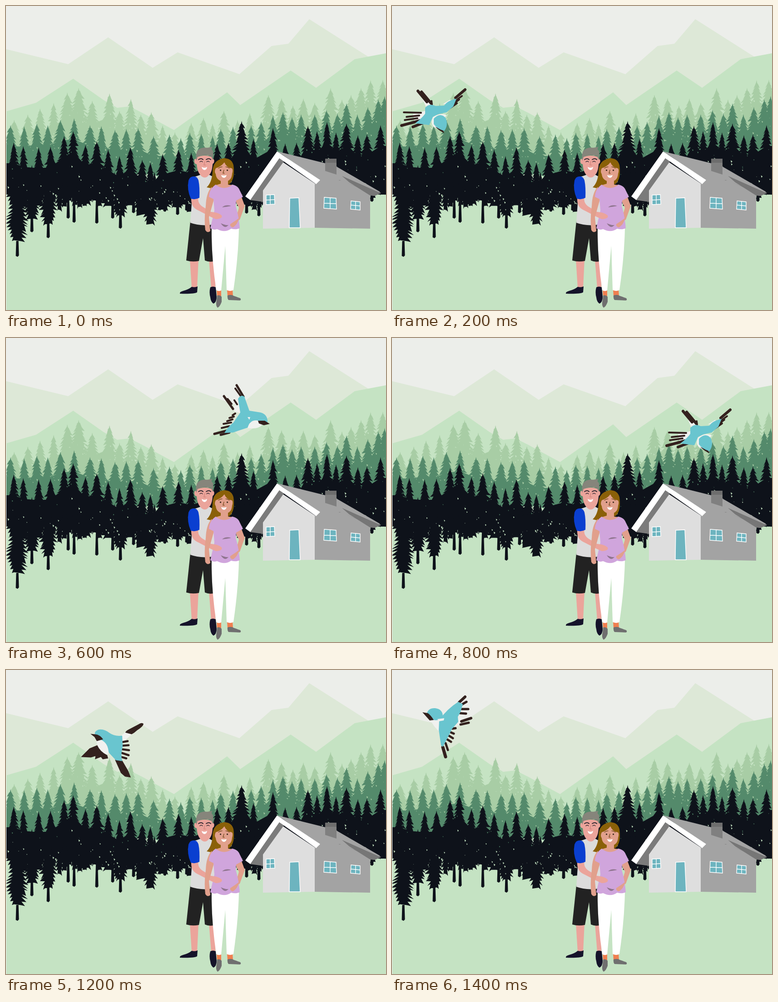
Animation of 837 by 669 pixels, one loop 1600 ms. Source, as an HTML page:

```html
<!DOCTYPE html>
<html lang="en">
<head>
<meta charset="utf-8">
<title>Forest home</title>
<style>
html, body { margin: 0; width: 100%; height: 100%; overflow: hidden; background: #eceeea; }
svg { display: block; width: 100%; height: 100%; }
.line { fill: none; stroke-linecap: round; stroke-linejoin: round; }
</style>
</head>
<body>
<svg viewBox="0 0 837 669">
  <rect width="837" height="669" fill="#eceeea"/>
  <path fill="#dde8d7" d="M0 95L137 128L225 69L323 136L378 102L514 150L585 88L622 83L668 29L797 111L837 137V400H0Z"/>
  <path fill="#c5e3c3" d="M0 232L66 213L148 160L215 207L245 224L272 221L300 235L370 273L487 190L516 218L627 142L683 180L768 117L837 104V669H0Z"/>
  <g id="forest"></g>
  <path fill="#eceeea" d="M0 232H1V669H0Z"/>

  <g id="house">
    <path fill="#dedede" d="M566 404L606 341L681 391L680 488L566 490Z"/>
    <path fill="#a3a3a3" d="M680 392L700 374L802 410V490L680 488Z"/>
    <path fill="#767676" d="M692 382L735 369L826 411L812 418L692 390Z"/>
    <path fill="#a3a3a3" d="M598 320L703 346L729 354L824 409L812 413L735 383L712 391L691 384Z"/>
    <path fill="#a3a3a3" d="M684 392L692 383L740 384L802 411V430H682Z"/>
    <path fill="#767676" d="M740 374L826 412L811 418L802 417L756 388Z"/>
    <path fill="#7b7b7b" d="M601 332L612 342L566 406V431L537 427Z"/>
    <path fill="#fff" d="M597 320L692 383L683 392L602 335L538 427L527 419Z"/>
    <path fill="#808080" d="M703 344H728V371L703 363Z"/>
    <path fill="#6e6e6e" d="M703 336H728V345H703Z"/>
    <g fill="#6db4bf" stroke="#fff" stroke-width="1.4">
      <path d="M625 423L645 422L648 488H624Z"/>
      <path d="M573 416L591 415L592 436L573 437ZM582 416V437M573 427L592 426"/>
      <path d="M701 421L727 423L728 447L700 445ZM714 422V446M701 434L728 435"/>
      <path d="M760 429L780 431V449L759 447ZM770 430V448M759 438L780 440"/>
    </g>
  </g>

  <g id="man">
    <path fill="#eba49b" d="M405 558H424L421 620H409ZM447 558H463L461 621H452Z"/>
    <path fill="#15132a" d="M409 618Q417 620 422 617L421 630Q415 634 383 633Q382 629 390 627Q402 624 409 618ZM450 619Q456 616 462 619L464 640Q464 652 457 655Q451 651 450 641Q447 630 450 619Z"/>
    <path fill="#222" d="M406 474H456L461 561Q449 565 438 560L434 511L425 561Q410 564 397 560Z"/>
    <path fill="#dcdcdc" d="M411 377Q422 374 429 371H447L462 379V480Q430 486 406 477L410 420Z"/>
    <path fill="#eba49b" d="M429 362H446V373Q438 382 429 373ZM408 423L424 420Q421 433 432 441L458 457Q470 457 475 462Q477 468 462 469Q449 463 420 448Q407 441 408 423Z"/>
    <path fill="#0a3fd0" d="M416 375Q405 374 402 384Q398 404 407 424Q417 427 426 422Q427 398 424 384Q422 377 416 375Z"/>
    <path fill="#eba49b" d="M420 333Q438 325 455 333L456 337Q460 337 458 345L455 348Q454 375 437 376Q422 374 420 348Q414 348 415 339Q416 335 420 337Z"/>
    <path fill="#86857b" d="M419 341Q417 326 422 318Q431 310 443 312L455 310Q450 315 456 319Q457 329 455 339L452 330Q436 325 422 332Z"/>
    <path class="line" stroke="#332a32" stroke-width="2" d="M424 338Q430 334 434 338M441 338Q447 334 451 338"/>
    <path class="line" stroke="#332a32" stroke-width="1.3" d="M427 343Q430 340 433 343M442 343Q445 340 448 343"/>
    <path class="line" stroke="#d5867e" stroke-width="1.5" d="M438 342L436 350H440"/>
    <path fill="#fff" d="M431 354Q437 358 443 354Q442 361 437 361Q432 360 431 354Z"/>
  </g>

  <g id="woman">
    <path fill="#8a6008" d="M480 335Q497 335 501 350Q505 380 493 391L478 399Q460 404 442 399Q454 388 455 363Q456 339 480 335Z"/>
    <path fill="#f07f50" d="M464 624H474V639H465ZM487 624H499L500 639H488Z"/>
    <path fill="#6f6f6f" d="M465 637Q471 635 475 640V651Q471 662 466 664Q461 659 464 647ZM488 637Q496 634 502 638L516 643Q519 647 515 648L490 647Q487 643 488 637Z"/>
    <path fill="#fff" d="M453 488H513Q512 550 501 625Q494 629 486 625L483 528L474 626Q467 629 463 625Q452 550 453 488Z"/>
    <path fill="#e1a08c" d="M453 398Q441 411 440 440Q436 468 439 493Q444 501 450 495L447 465L459 422ZM519 421L505 427L513 444Q508 460 506 477L515 470L526 440Z"/>
    <path fill="#d0a5dc" d="M462 393Q481 405 498 393Q511 395 515 406L522 420L507 428L506 440Q513 463 515 489Q506 493 496 490Q482 500 465 491Q457 494 450 489L459 450L457 425L447 420Q448 402 462 393Z"/>
    <path fill="#e1a08c" d="M473 377H489V393L498 394Q480 407 463 394L473 391ZM514 466Q510 481 500 487Q493 486 494 480L506 472Z"/>
    <path fill="#eba49b" d="M452 453Q470 455 475 461Q478 468 462 469L449 463Z"/>
    <path fill="#8f758f" d="M476 443Q484 436 496 440Q487 442 476 443ZM473 478Q483 483 490 482Q482 492 473 478Z"/>
    <path fill="#e1a08c" d="M462 357Q473 354 481 344Q486 356 497 357Q501 359 498 369Q497 386 480 387Q463 384 462 370Q458 365 462 357Z"/>
    <path class="line" stroke="#805328" stroke-width="1.5" d="M468 357Q472 354 476 354M484 354Q488 354 492 357M480 361L478 368H481"/>
    <path fill="#50382b" d="M471 360H474V363H471ZM486 360H489V363H486Z"/>
    <path fill="#fff" d="M474 372Q480 374 486 372Q484 379 479 378Q475 377 474 372Z"/>
  </g>
  <g id="bird"></g>
</svg>
<script>
const NS = "http://www.w3.org/2000/svg";
let seed = 7;

function rand(a = 0, b = 1) {
  seed = (seed * 16807) % 2147483647;
  return a + (b - a) * seed / 2147483647;
}

function add(parent, d, fill, line) {
  const p = document.createElementNS(NS, "path");
  p.setAttribute("d", d);
  p.setAttribute("fill", line ? "none" : fill);
  if (line) {
    p.setAttribute("stroke", fill);
    p.setAttribute("stroke-width", line);
    p.setAttribute("class", "line");
  }
  parent.appendChild(p);
}

const shape = pts => "M" + pts.map(p => p.map(v => v.toFixed(1)).join(" ")).join("L") + "Z";

// A fir: drooping branch tips down both sides of a spire
function tree(x, top, h, w) {
  const n = Math.round(h / 8);
  const side = s => {
    const pts = [];
    for (let i = 1; i <= n; i++) {
      const t = i / n;
      const taper = t > .72 ? 1 - (t - .72) * 2 : 1;
      const r = w * t ** .72 * taper;
      const y = top + h * t;
      pts.push([x + s * r * rand(.8, 1.15), y + rand(0, 4)]);
      pts.push([x + s * r * rand(.4, .62), y + rand(-2, 1)]);
    }
    return pts;
  };
  return shape([[x, top], [x + 1.2, top + 6], ...side(1), ...side(-1).reverse(), [x - 1.2, top + 6]]);
}

function layer(parent, color, flat, h, w, floor, gap) {
  const tops = [];
  for (let i = 0; i < flat.length; i += 2) tops.push([flat[i], flat[i + 1]]);
  let d = shape([[0, tops[0][1] + gap], ...tops.map(([x, y]) => [x, y + gap]),
    [837, tops.at(-1)[1] + gap], [837, floor], [0, floor]]);
  for (const [x, y] of tops) d += tree(x, y, h + rand(-8, 8), w * rand(.85, 1.15));
  add(parent, d, color);
  return tops;
}

function specks(parent, color, tops, near, far, count, size) {
  let d = "";
  for (let i = 0; i < count; i++) {
    const [tx, ty] = tops[Math.floor(rand(0, tops.length))];
    const x = tx + rand(-15, 15), y = ty + rand(near, far), s = rand(1, size);
    d += shape([[x, y], [x + s, y + s * .6], [x + s * .3, y + s * 1.4]]);
  }
  add(parent, d, color);
}

const forest = document.getElementById("forest");
const light = layer(forest, "#a8cda5", [
  18, 250, 48, 238, 75, 225, 105, 213, 135, 190, 160, 180, 190, 208, 228, 192,
  250, 230, 275, 204, 297, 238, 320, 233, 345, 262, 372, 277, 408, 256, 435, 245,
  455, 258, 480, 230, 510, 250, 537, 235, 578, 195, 607, 202, 632, 218, 655, 203,
  680, 212, 715, 180, 740, 205, 760, 195, 782, 180, 803, 163, 830, 162
], 88, 25, 340, 52);
specks(forest, "#c5e3c3", light, 42, 85, 130, 4);

const mid = layer(forest, "#548a6b", [
  10, 262, 40, 264, 68, 258, 92, 262, 120, 250, 150, 247, 185, 262, 210, 264,
  240, 272, 265, 270, 291, 268, 325, 285, 360, 282, 385, 290, 405, 278, 430, 280,
  455, 285, 473, 270, 500, 265, 540, 262, 562, 254, 588, 240, 610, 233, 630, 244,
  650, 238, 680, 238, 706, 228, 730, 236, 750, 214, 774, 238, 797, 222, 820, 205, 834, 198
], 88, 24, 370, 46);
specks(forest, "#a8cda5", mid, 40, 75, 90, 4);

const dark = layer(forest, "#0e121a", [
  17, 300, 38, 308, 72, 311, 98, 309, 128, 286, 148, 275, 175, 305, 200, 297,
  225, 315, 250, 330, 274, 310, 300, 338, 318, 344, 345, 325, 380, 315, 408, 322,
  465, 302, 490, 300, 519, 253, 545, 292, 588, 268, 615, 302, 640, 300, 665, 263,
  685, 275, 707, 255, 727, 278, 750, 258, 775, 284, 795, 282, 825, 262
], 128, 28, 415, 46);

let under = tree(25, 375, 142, 34) + tree(57, 350, 118, 26) + tree(93, 355, 125, 28) + tree(252, 350, 112, 26);
for (let x = 118; x < 570; x += 11) under += tree(x, 365, rand(62, 84), 13);
under += tree(808, 350, 72, 14) + tree(829, 345, 70, 14);
const trunks = [25, 551, 57, 497, 93, 510, 137, 467, 150, 476, 200, 478, 235, 467, 252, 489,
  281, 455, 291, 460, 320, 459, 339, 449, 350, 452, 378, 459, 398, 450, 530, 456, 557, 462, 806, 430];
for (let i = 0; i < trunks.length; i += 2) {
  const x = trunks[i], y = trunks[i + 1];
  under += `M${x - 1.5} ${y - 70}h3l2 68l-3 3l-4-2Z`;
}
add(forest, under, "#0e121a");
specks(forest, "#548a6b", dark, 40, 75, 40, 3);
specks(forest, "#c5e3c3", dark, 75, 118, 110, 4);

const BLUE = "#69c5cf", DARK = "#33211e", PALE = "#f0f1ef";

// Each part: path, colour and, for feathers, a line width
const poses = {
  glide: [
    ["M222 130Q226 126 233 131L254 142Q264 147 262 152L250 154Q242 150 236 144Q223 136 222 130Z", DARK],
    ["M248 153L263 149L272 157L270 171Q258 163 248 153Z", PALE],
    ["M268 170L257 168M269 178L255 177M269 186L254 188M270 194L255 199M271 203L260 206", DARK, 4.5],
    ["M270 209L285 209L272 238L263 246L250 248L256 233Z", DARK],
    ["M269 156Q286 158 297 150Q310 140 322 143Q331 147 329 153L314 160L318 166Q305 172 302 184L298 194L283 210L269 212Q273 198 268 180Z", BLUE],
    ["M316 165L326 167Q324 185 310 194Q300 201 299 193Q300 172 316 165Z", PALE],
    ["M311 164Q318 154 328 153L339 152L330 159L325 168Z", DARK],
    ["M324 177L341 184L360 203L338 204L328 201L329 208L316 203L312 208L300 206L302 199Q318 191 324 177Z", DARK]
  ],
  lift: [
    ["M502 149L515 147L517 166L503 161Z", PALE],
    ["M480 128L500 156M508 104L523 129", DARK, 5],
    ["M505 111L518 129M488 134L497 145M503 137L509 146M505 166L499 170M502 173L492 176M499 179L487 183M496 186L479 189M492 194L475 198", DARK, 4],
    ["M486 204L459 211M492 208L473 213", DARK, 5],
    ["M511 134Q517 123 525 129L536 160L555 163Q577 165 576 186L556 186L536 188L533 197L500 208L481 209Q487 197 501 186L516 164Z", BLUE],
    ["M532 198Q538 178 556 182L565 190Q556 202 532 198ZM532 174L538 174L536 180Z", PALE],
    ["M555 182L570 182L581 189L568 192L557 188Z", DARK]
  ],
  turn: [
    ["M652 180L666 177L676 194L660 199ZM630 212L660 204L665 230L634 232ZM696 190L712 180L718 190Z", PALE],
    ["M641 161L661 185M649 163L670 188M745 158L724 176", DARK, 6],
    ["M671 183L672 191M738 172L722 184M732 180L717 191M727 188L711 199", DARK, 4],
    ["M648 209L610 208M644 215L616 218M640 221L612 225", DARK, 4],
    ["M646 226L605 237M656 230L630 240", DARK, 6],
    ["M657 198Q666 187 680 194L699 193Q706 182 726 178L719 195L704 208L686 212L674 218L666 236L635 232Q650 221 657 211Z", BLUE],
    ["M674 219Q690 207 704 214L684 245Q666 238 674 219Z", PALE],
    ["M668 235L672 241M679 240L696 246L699 254L689 248Z", DARK],
    ["M676 222Q690 207 702 220Q709 236 699 249Q683 244 676 234Z", BLUE]
  ],
  climb: [
    ["M140 110L152 104L156 111L145 120ZM84 109L104 107L107 138Q92 126 84 109Z", PALE],
    ["M148 71L161 59M153 113L174 106", DARK, 6],
    ["M152 77L164 70M153 86L168 86M150 95L163 96M151 120L169 116M133 129L140 128M129 137L136 140M126 145L134 150M122 153L130 158M118 161L123 176", DARK, 5],
    ["M112 170L118 191", DARK, 7],
    ["M104 110Q122 85 146 70L156 75L151 92L145 103L146 114L132 130L122 150L112 169L108 166L103 132Z", BLUE],
    ["M76 97Q80 83 95 84Q111 86 112 101Q107 113 92 110Z", BLUE],
    ["M100 108L115 106L114 111L103 113Z", PALE],
    ["M67 93L79 95Q85 99 92 110L83 111L75 102Z", DARK]
  ]
};

const STEP = 200;
const flight = [
  null,
  ["turn", "translate(-584 26)"],
  ["glide", ""],
  ["lift", ""],
  ["turn", ""],
  ["turn", "translate(1129 -34) scale(-1 1)"],
  ["glide", "translate(525 -11.5) scale(-1 1)"],
  ["climb", ""]
];

const bird = document.getElementById("bird");
const groups = {};
for (const name in poses) {
  const g = groups[name] = document.createElementNS(NS, "g");
  for (const part of poses[name]) add(g, ...part);
  bird.appendChild(g);
}

let shown = -1;
function draw(now) {
  const i = Math.floor(now / STEP) % flight.length;
  if (i !== shown) {
    shown = i;
    const step = flight[i];
    for (const name in groups) groups[name].style.display = step && step[0] === name ? "" : "none";
    if (step) bird.setAttribute("transform", step[1]);
  }
}

const start = performance.now();
function tick() {
  draw(performance.now() - start);
  requestAnimationFrame(tick);
}
tick();
</script>
</body>
</html>
```
